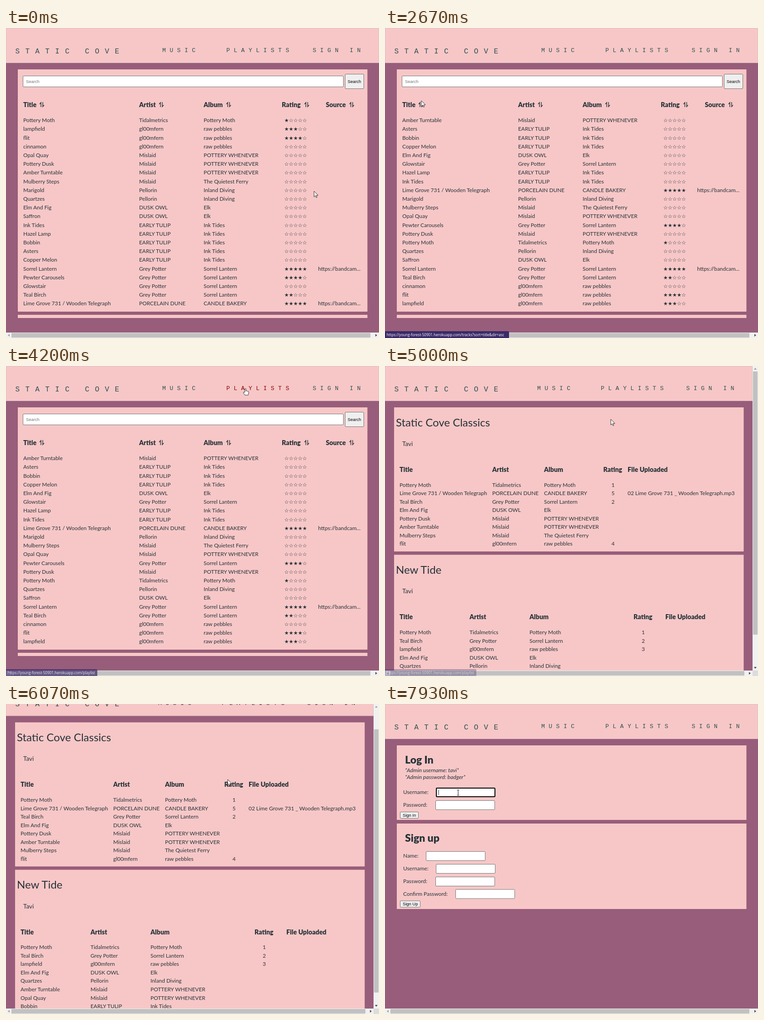
Animation, 821 px wide and 682 px high, one loop 8000 ms. Source, as an HTML page:

```html
<!DOCTYPE html>
<html lang="en">
<head>
<meta charset="utf-8">
<title>Music library</title>
<style>
html, body { margin: 0; width: 100%; height: 100%; overflow: hidden; background: #985d7a; }
svg { display: block; }
text { font: 11.9px Lato, "Open Sans", sans-serif; fill: #263238; white-space: pre; }
.head { font-size: 14.2px; font-weight: 900; }
.title { font-size: 24px; }
.owner { font-size: 13.5px; }
.big { font-size: 23px; font-weight: 900; }
.hint { font-size: 12.2px; font-style: italic; }
.mid { text-anchor: middle; }
.stars { font: 11.2px "DejaVu Sans", sans-serif; text-anchor: middle; }
.ui { font: 9.4px "Liberation Sans", Arial, sans-serif; fill: #000; }
.logo { font: 16px "Liberation Mono", monospace; letter-spacing: 12.3px; fill: #2f4f4f; }
.link { font: 13px "Liberation Mono", monospace; letter-spacing: 8.5px; fill: #2f4f4f; }
.link.on { fill: #8b0000; }
#status text { font: 8.1px "Open Sans", "Noto Sans", sans-serif; fill: #fff; }
</style>
</head>
<body>
<svg id="stage" width="821" height="682" viewBox="0 0 821 682"></svg>
<script>
const PINK = '#f7c7c7', LOOP = 8000, STEP = 1000 / 15;
const SITE = 'https://young-forest-50901.herokuapp.com';

// title | artist | album | rating | has a source link
const songs = `Pottery Moth|Tidalmetrics|Pottery Moth|1
lampfield|gl00mfern|raw pebbles|3
flit|gl00mfern|raw pebbles|4
cinnamon|gl00mfern|raw pebbles|0
Opal Quay|Mislaid|POTTERY WHENEVER|0
Pottery Dusk|Mislaid|POTTERY WHENEVER|0
Amber Turntable|Mislaid|POTTERY WHENEVER|0
Mulberry Steps|Mislaid|The Quietest Ferry|0
Marigold|Pellorin|Inland Diving|0
Quartzes|Pellorin|Inland Diving|0
Elm And Fig|DUSK OWL|Elk|0
Saffron|DUSK OWL|Elk|0
Ink Tides|EARLY TULIP|Ink Tides|0
Hazel Lamp|EARLY TULIP|Ink Tides|0
Bobbin|EARLY TULIP|Ink Tides|0
Asters|EARLY TULIP|Ink Tides|0
Copper Melon|EARLY TULIP|Ink Tides|0
Sorrel Lantern|Grey Potter|Sorrel Lantern|5|y
Pewter Carousels|Grey Potter|Sorrel Lantern|4
Glowstair|Grey Potter|Sorrel Lantern|0
Teal Birch|Grey Potter|Sorrel Lantern|2
Lime Grove 731 / Wooden Telegraph|PORCELAIN DUNE|CANDLE BAKERY|5|y`
  .split('\n').map(line => line.split('|'));
const sorted = [...songs].sort((a, b) => a[0] < b[0] ? -1 : 1);

const text = (x, y, str, cls = '') => `<text x="${x}" y="${y}" class="${cls}">${str}</text>`;
const rect = (x, y, w, h, fill, more = '') =>
  `<rect x="${x}" y="${y}" width="${w}" height="${h}" fill="${fill}" ${more}/>`;
const group = (id, body) => `<g id="${id}">${body}</g>`;
const card = (x, y, h) => rect(x, y, 769.5, h, PINK);
const box = (x, y, w, h, fill = '#fff', id = '') =>
  rect(x + .5, y + .5, w - 1, h - 1, fill, `rx="1.5" stroke="#767676" id="${id}"`);
const button = (x, y, w, h, label, tx, ty) => box(x, y, w, h, '#efefef') + text(tx, ty, label, 'ui');
const arrow = (x, y, turn, fill) =>
  `<path d="M-2 -3L2 0L-2 3Z" fill="${fill}" transform="translate(${x} ${y}) rotate(${turn})"/>`;

// Navigation: label, text start, clickable span, shift when a vertical scrollbar is present
const links = [['MUSIC', 344, 340, 421, 9], ['PLAYLISTS', 485, 480, 628, 10], ['SIGN IN', 675, 670, 784, 12]];
const header = narrow => {
  const w = narrow ? 809 : 821;
  return rect(.5, .5, w - 1, 76, PINK, 'stroke="#dcc0c2"') + text(20.5, 56, 'STATIC COVE', 'logo') +
    links.map(([label, x, , , shift]) => text(x - narrow * shift, 53, label, 'link')).join('');
};

const heads = [['Title', 38, 73], ['Artist', 293, 336], ['Album', 435, 484], ['Rating', 607, 656], ['Source', 704, 755]];
const songRows = list => list.map(([title, artist, album, rating, source], i) => {
  const y = 207.3 + 19.19 * i;
  return text(38, y, title) + text(293, y, artist) + text(435, y, album) +
    text(637.5, y, '★'.repeat(rating) + '☆'.repeat(5 - rating), 'stars') +
    (source ? text(687, y, 'https://bandcam...') : '');
}).join('');

const home = header(0) + card(26, 91, 533) + card(26, 631, 7) +
  box(37, 105, 706, 25, '#fff', 'search') + '<text x="44" y="121.3" class="ui" style="fill:#757575">Search</text>' +
  button(746, 101, 42, 33, 'Search', 752, 121.3) +
  heads.map(([label, x, icon]) => text(x, 173.5, label, 'head') +
    `<path d="M4 11V1L1 4.5M8 0V10L11 6.5" fill="none" stroke="#263238" stroke-width="1.4" transform="translate(${icon} 163)"/>`).join('') +
  group('plain', songRows(songs)) + group('ordered', songRows(sorted));

const playlist = (top, h, name, cols, picks) => {
  const [artist, album, rating, file] = cols;
  const labels = [['Title', 32], ['Artist', artist], ['Album', album], ['Rating', rating - 21.5], ['File Uploaded', file]];
  return card(20, top, h) + text(24, top + 41.7, name, 'title') + text(38, top + 85, 'Tavi', 'owner') +
    labels.map(([label, x]) => text(x, top + 142, label, 'head')).join('') +
    picks.map((n, i) => {
      const [title, by, on, stars, source] = songs[n], y = top + 174.7 + 18.53 * i;
      return text(32, y, title) + text(artist, y, by) + text(album, y, on) +
        (stars > 0 ? text(rating, y, stars, 'mid') : '') +
        (source ? text(file, y, `02 ${title.replace('/', '_')}.mp3`) : '');
    }).join('');
};
const playlists = header(1) +
  playlist(91, 317, 'Static Cove Classics', [236, 350, 502, 534], [0, 21, 20, 10, 5, 6, 7, 2]) +
  playlist(415.3, 317, 'New Tide', [186, 318, 568.5, 617], [0, 20, 1, 10, 9, 6, 4, 14]);

const field = (label, y, x) => text(40, y + 4, label) + box(x, y - 10, 131, 21);
const login = header(0) + card(26, 91, 164) + card(26, 263, 188) +
  text(44, 131, 'Log In', 'big') + text(44, 150, '*Admin username: tavi*', 'hint') +
  text(44, 165.3, '*Admin password: badger*', 'hint') +
  field('Username:', 194, 112) + field('Password:', 222, 111) + button(33, 237, 41, 15, 'Sign In', 39, 247.8) +
  text(44, 302.5, 'Sign up', 'big') + field('Name:', 334, 90) + field('Username:', 362, 112) +
  field('Password:', 390, 111) + field('Confirm Password:', 417.5, 155) + button(33, 432.5, 45, 15, 'Sign Up', 39, 443.3) +
  group('focus', rect(113, 185, 129, 19, '#fff', 'rx="2" stroke="#000" stroke-width="2"') + rect(117.5, 189, 1, 11, '#222'));

const bars = rect(0, 670, 821, 12, '#f1f1f1') + rect(12, 671, 790, 10, '#c1c1c1', 'id="hthumb"') +
  arrow(6, 676, 180, '#a3a3a3') + group('harrow', arrow(815, 676, 0, '#505050')) +
  group('vbar', rect(809, 0, 12, 670, '#f1f1f1') + rect(810, 12, 10, 579, '#c1c1c1', 'id="vthumb"') +
    rect(809, 670, 12, 12, '#dcdcdc') + arrow(815, 6, -90, '#a3a3a3') + arrow(815, 664, 90, '#505050'));

const ink = 'fill="#fff" stroke="#000" stroke-width=".8" stroke-linejoin="round"';
const pointer =
  group('arrow', `<path ${ink} d="M0 0V12.5L2.9 9.8L4.8 14L6.7 13.2L4.9 9.1H9Z"/>`) +
  group('hand', `<path ${ink} d="M-1.2 8V.4Q0-1 1.2 .4V5Q2.8 4 3.6 5.4Q5 4.7 5.6 6Q7.2 5.6 7.2 7.2V10L5.8 14H-.8L-4.6 9Q-4.6 7-2.8 7.4Z"/>`) +
  group('beam', '<path d="M-2.5 -6H-.5L0 -5.5L.5 -6H2.5M0 -5.5V5.5M-2.5 6H-.5L0 5.5L.5 6H2.5" fill="none" stroke="#111"/>');

const stage = document.getElementById('stage');
stage.innerHTML = rect(0, 0, 821, 682, '#985d7a') +
  group('home', home) + group('playlists', playlists) + group('login', login) + bars +
  group('status', rect(-3, 667, 10, 18, '#3a2a68', 'rx="2"') + text(3.5, 677.8, '')) + group('pointer', pointer);
const $ = id => document.getElementById(id);
const show = (id, on) => $(id).style.display = on ? '' : 'none';
const linkTexts = [...stage.querySelectorAll('.link')];

// Pointer stops: time, x, y
const path = [[200, 678, 359], [1000, 385, 40], [1270, 385, 40], [1670, 127, 205], [2000, 80, 160], [3530, 80, 160],
  [3930, 527, 50], [4870, 527, 50], [5000, 497, 117], [5130, 488, 166], [6270, 488, 166], [6730, 699, 36],
  [7330, 699, 36], [7930, 161, 195]];
// Link previews: appears, gone, width, address
const previews = [[1200, 1800, 172, ''], [2200, 3270, 273, '/tracks?sort=title&dir=asc'],
  [4130, 5070, 201, '/playlist'], [6800, 7530, 194, '/login']];
const handTimes = [[1200, 1330], [2200, 2670], [4130, 4870], [6800, 7330]];

const clamp = v => Math.max(0, Math.min(1, v));
const ease = (t, a, b) => { const p = clamp((t - a) / (b - a)); return p * p * (3 - 2 * p); };
const within = (v, a, b) => v >= a && v < b;

function pointerAt(t) {
  let [, x, y] = path[0];
  for (let i = 1; i < path.length; i++) {
    const p = ease(t, path[i - 1][0], path[i][0]);
    x += (path[i][1] - path[i - 1][1]) * p;
    y += (path[i][2] - path[i - 1][2]) * p;
  }
  return [x, y];
}

function draw(now) {
  const t = Math.floor(now % LOOP / STEP + .06) * STEP + 5;
  const view = t < 4670 ? 'home' : t < 7070 ? 'playlists' : 'login';
  const narrow = view === 'playlists';
  for (const id of ['home', 'playlists', 'login']) show(id, id === view);
  show('plain', t < 2670);
  show('ordered', t >= 2670);
  show('focus', t >= 7930);

  const scroll = 77 * (ease(t, 5200, 5530) - ease(t, 5930, 6290));
  $('playlists').setAttribute('transform', `translate(0 ${-scroll})`);
  $('vthumb').setAttribute('y', 12 + scroll * .863);
  $('hthumb').setAttribute('width', narrow ? 779 : 790);
  $('harrow').setAttribute('transform', `translate(${narrow ? -12 : 0} 0)`);
  show('vbar', narrow);

  const [x, y] = pointerAt(t);
  linkTexts.forEach((el, i) => {
    const [, , left, right, shift] = links[i % 3], dx = narrow * shift;
    el.classList.toggle('on', within(y, 22, 55) && within(x, left - dx, right - dx));
  });
  const inSearch = view === 'home' && within(x, 37, 743) && within(y, 105, 130);
  const inName = view === 'login' && within(x, 112, 243) && within(y, 184, 205);
  $('search').setAttribute('stroke', inSearch ? '#3c3c3c' : '#767676');
  const hand = handTimes.some(([a, b]) => within(t, a, b));
  const shape = hand ? 'hand' : inSearch || inName ? 'beam' : 'arrow';
  for (const id of ['arrow', 'hand', 'beam']) show(id, id === shape);
  $('pointer').setAttribute('transform', `translate(${x.toFixed(1)} ${y.toFixed(1)})`);

  const preview = previews.find(([a, b]) => within(t, a, b));
  show('status', preview);
  if (preview) {
    const [from, to, width, address] = preview, [plate, label] = $('status').children;
    $('status').style.opacity = Math.min(clamp((t - from + 67) / 200), clamp((to - t) / 200));
    plate.setAttribute('width', width + 3);
    label.textContent = SITE + address;
  }
}

const start = performance.now();
(function tick() {
  draw(performance.now() - start);
  requestAnimationFrame(tick);
})();
</script>
</body>
</html>
```
